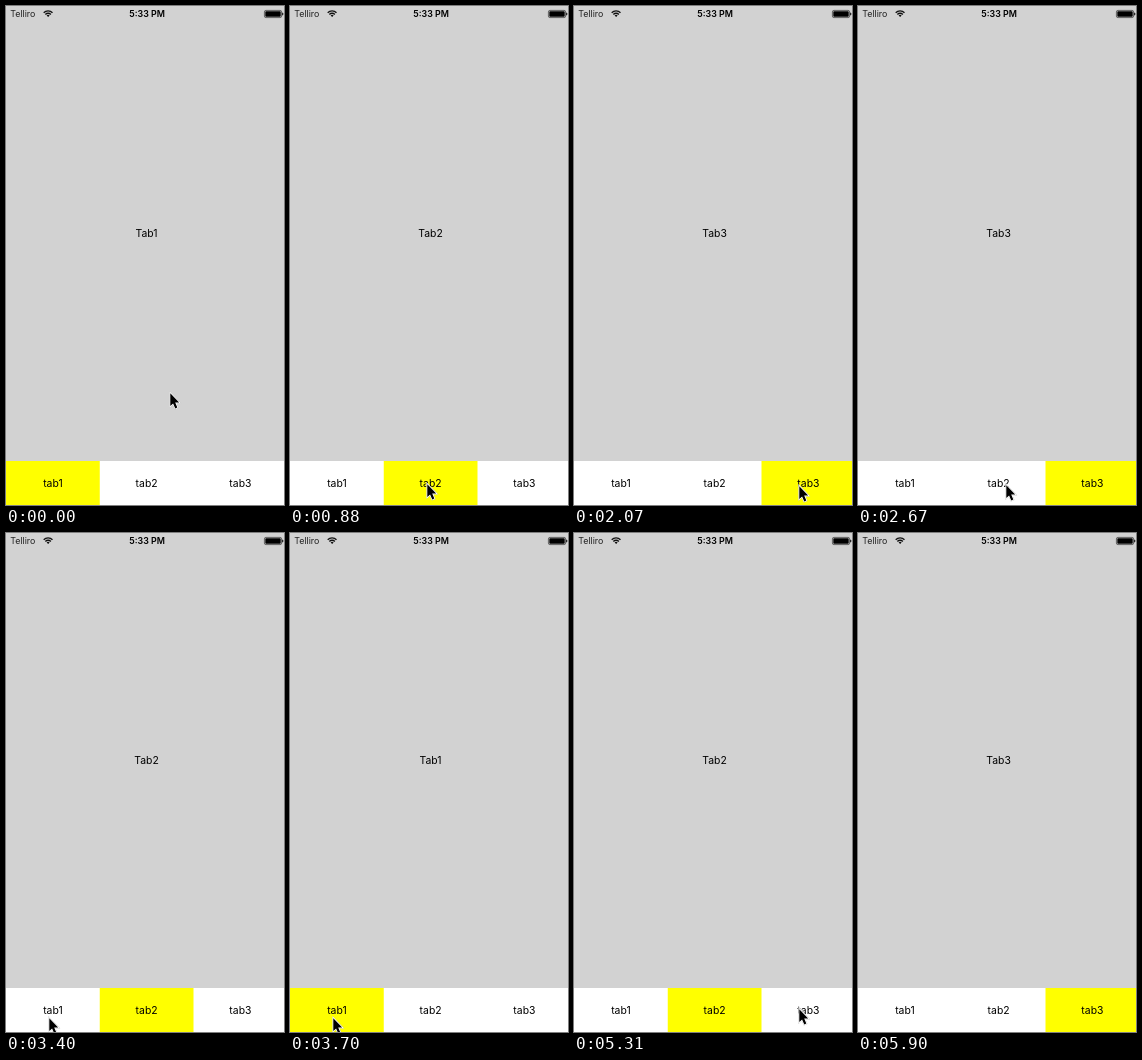
Write an HTML page that moves like this. It is 278 px wide and 499 px high and loops after 6650 ms.

```html
<!DOCTYPE html>
<html lang="en">
<head>
<meta charset="utf-8">
<title>Tab switching</title>
<style>
  html, body { margin: 0; width: 100%; height: 100%; overflow: hidden; }
  svg { display: block; width: 278px; height: 499px; background: #d2d2d2; }
  text { font: 10.4px Inter, Roboto, sans-serif; text-anchor: middle; }
  .status { font-size: 8.9px; }
  .network { text-anchor: start; fill: #222; }
  .clock { font-weight: 600; }
  .wifi { fill: none; stroke: #111; stroke-width: 1.4; }
  #cursor { filter: drop-shadow(0 .8px .7px #0006); }
</style>
</head>
<body>
<svg viewBox="0 0 278 499">
  <text class="status network" x="4.2" y="11">Telliro</text>
  <g class="wifi">
    <path d="M37.7 6.7a6.2 6.2 0 0 1 8.8 0M39.4 8.4a3.8 3.8 0 0 1 5.4 0"/>
    <path d="M42.1 11l-1.5-1.5a2.1 2.1 0 0 1 3 0z" fill="#111" stroke="none"/>
  </g>
  <text class="status clock" x="141.2" y="11">5:33 PM</text>
  <rect x="258.4" y="4.4" width="17.2" height="7.2" rx="1.5" fill="none" stroke="#333" stroke-width=".7"/>
  <rect x="259.3" y="5.2" width="15.4" height="5.6" rx=".7"/>
  <path d="M276.2 6.6q1.2 .2 1.2 1.4t-1.2 1.4z"/>

  <text id="title" x="140.6" y="231.4"></text>

  <rect y="455" width="278" height="44" fill="#fff"/>
  <rect id="active" y="455" width="93.75" height="44" fill="#ff0"/>
  <text x="46.9" y="481.3">tab1</text>
  <text x="140.6" y="481.3">tab2</text>
  <text x="234.4" y="481.3">tab3</text>

  <path id="cursor" d="M1.3 2.2V15L4.1 12.4 6.3 17.4 8.3 16.5 6.2 11.6H10.2Z"
        stroke="#fff" stroke-width="1.8" paint-order="stroke"/>
</svg>
<script>
const LOOP = 6650, STEP = LOOP / 45, LEAD = 12;

// [step, tab index]
const tabs = [[0, 0], [6, 1], [14, 2], [19, 1], [25, 0], [33, 1], [38, 2]];

// Each move: [first step, last step, end x, end y]
const moves = [
  [0, 4, 136, 476], [8, 12, 224, 478], [14, 18, 147, 477], [20, 23, 42, 483],
  [26, 30, 124, 481], [33, 36, 224, 474], [38, 40, 290, 510]
];

const $ = id => document.getElementById(id);
const ease = u => u * u * (3 - 2 * u);

function cursorAt(step) {
  let x = 163, y = 385;
  for (const [from, to, endX, endY] of moves) {
    const u = ease(Math.min(1, Math.max(0, (step - from) / (to - from))));
    x += (endX - x) * u;
    y += (endY - y) * u;
  }
  return [x, y];
}

function draw(now) {
  const step = Math.floor((now % LOOP + LEAD) / STEP);
  const tab = tabs.filter(([start]) => start <= step).pop()[1];
  $('title').textContent = 'Tab' + (tab + 1);
  $('active').setAttribute('x', tab * 93.75);
  $('cursor').setAttribute('transform', `translate(${cursorAt(step)})`);
}

let start;
function tick(now) {
  start ??= now;
  draw(now - start);
  requestAnimationFrame(tick);
}
draw(0);
requestAnimationFrame(tick);
</script>
</body>
</html>
```
